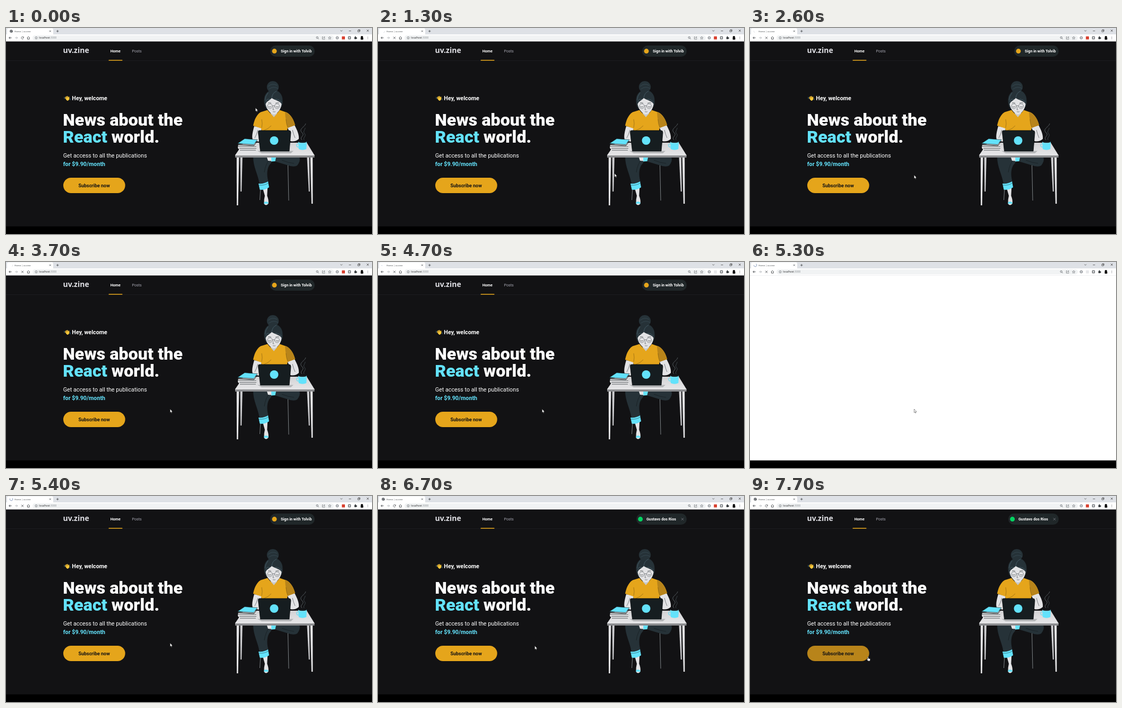
These frames come from a looping animation (690x388 px, 8000 ms). An HTML page with a canvas:

```html
<!DOCTYPE html>
<html lang="en">
<head>
<meta charset="utf-8">
<title>Home | uv.zine</title>
<style>
html, body { margin: 0; width: 100%; height: 100%; overflow: hidden; background: #000; }
canvas { display: block; width: 690px; height: 388px; }
</style>
</head>
<body>
<canvas id="stage"></canvas>
<script>
const W = 690, H = 388, LOOP = 8000, STEP = 100;
const canvas = document.getElementById('stage');
const ctx = canvas.getContext('2d');
const dpr = window.devicePixelRatio || 1;
canvas.width = W * dpr;
canvas.height = H * dpr;

const BG = '#121214', GOLD = '#e5a51b', SHADE = '#b8841a', CYAN = '#63e2fb';
const DARK = '#263238', INK = '#161d20', PALE = '#e3e3e5', ICON = '#5f6368';
const ROBOTO = 'Roboto, Arial, sans-serif', UI = '"Open Sans", "Noto Sans", sans-serif';

// Pointer path: time, x, y
const PATH = [
  [0, 470.4, 150.5], [200, 508, 92], [400, 546, 44], [700, 540, 46],
  [900, 451, 219], [1100, 446, 273], [1300, 446, 274], [1700, 444, 276],
  [2100, 438, 241], [2300, 392, 246], [2600, 309.4, 277], [6600, 309.4, 277],
  [6900, 268, 293], [7100, 228, 307], [7300, 221.5, 303]
];
const SPINS = [[1300, 2100], [2800, 3100], [3600, 6200]];

function fill(color, d) {
  ctx.fillStyle = color;
  ctx.fill(new Path2D(d));
}
function line(color, width, d) {
  ctx.strokeStyle = color;
  ctx.lineWidth = width;
  ctx.stroke(new Path2D(d));
}
function rect(color, x, y, w, h) {
  ctx.fillStyle = color;
  ctx.fillRect(x, y, w, h);
}
function round(color, x, y, w, h, r) {
  ctx.fillStyle = color;
  ctx.beginPath();
  ctx.roundRect(x, y, w, h, r);
  ctx.fill();
}
function ellipse(color, x, y, rx, ry = rx) {
  ctx.fillStyle = color;
  ctx.beginPath();
  ctx.ellipse(x, y, rx, ry, 0, 0, 7);
  ctx.fill();
}
function ring(color, x, y, r, width, from = 0, to = 2 * Math.PI) {
  ctx.strokeStyle = color;
  ctx.lineWidth = width;
  ctx.beginPath();
  ctx.arc(x, y, r, from, to);
  ctx.stroke();
}
function text(str, x, y, size, color, weight = 700, family = ROBOTO) {
  ctx.font = `${weight} ${size}px ${family}`;
  ctx.fillStyle = color;
  ctx.fillText(str, x, y);
  return x + ctx.measureText(str).width;
}
function cross(x, y, r, color, width) {
  line(color, width, `M${x - r} ${y - r}L${x + r} ${y + r}M${x + r} ${y - r}L${x - r} ${y + r}`);
}

function pointer(t) {
  let i = 1;
  while (i < PATH.length - 1 && PATH[i][0] < t) i++;
  const [t0, x0, y0] = PATH[i - 1], [t1, x1, y1] = PATH[i];
  const k = Math.min(1, Math.max(0, (t - t0) / (t1 - t0)));
  return [x0 + (x1 - x0) * k, y0 + (y1 - y0) * k];
}

function drawSpinner(t) {
  const steps = SPINS.reduce((n, [a, b]) => n + Math.max(0, Math.min(t, b) - a) / STEP, 0);
  if (t < 4700) {
    const a = -steps * 0.55;
    ring('#d3d6da', 10, 6, 2.8, 0.7, a, a + 1.5);
  } else {
    const a = 2.7 + (t - 4700) * 0.004;
    const sweep = 0.4 + 4 * Math.min(1, (t - 4700) / 500);
    ring('#6f86ad', 10, 6, 2.8, 0.8, a, a + sweep);
  }
}

function drawBrowser(t, loading) {
  rect('#dee1e6', 0, 0, W, 12);
  round('#fff', 2, 0.5, 87, 14, 3);
  rect('#fff', 0, 12, W, 13);
  rect('#dadce0', 0, 25, W, 0.4);
  if (loading) drawSpinner(t);
  else {
    ellipse('#4d5156', 10, 6, 2.8);
    line('#fff', 0.6, 'M8 5.2L10 6.3L9.5 8M10.2 3.8L11 5L12.2 5.3');
  }
  text('Home | uv.zine', 16, 7.7, 4.3, '#3c4043', 400, UI);
  cross(83.3, 6, 1.4, '#3c4043', 0.7);
  line('#3c4043', 0.8, 'M95 6H99.4M97.2 3.8V8.2');

  line('#333', 0.7, 'M630.5 4.4L632.3 6.2L634.1 4.4M646.5 5.5H650.5');
  line('#333', 0.7, 'M663.3 4.2H666.3V7.2H663.3ZM664.4 4V3.2H667.3V6.2H666.5');
  cross(682, 5, 1.9, '#333', 0.7);

  line('#4a4d51', 0.9, 'M10.5 18.5H5.7M8 16.2L5.7 18.5L8 20.8');
  line('#b4b7bb', 0.9, 'M17 18.5H21.8M19.5 16.2L21.8 18.5L19.5 20.8');
  if (loading) cross(31, 18.5, 2, '#4a4d51', 0.9);
  else {
    ring('#4a4d51', 31, 18.6, 2.2, 0.8, 0.5, 5.6);
    fill('#4a4d51', 'M33.6 16V18.4H31.2Z');
  }
  line('#4a4d51', 0.9, 'M39.7 18.5L42.3 16.2L44.9 18.5M40.5 18V21H44.1V18');

  round('#f1f3f4', 50, 13.7, 568, 9.8, 4.9);
  ring(ICON, 57, 18.5, 2.2, 0.6);
  line(ICON, 0.7, 'M57 18.1V19.8M57 17V17.5');
  const x = text('localhost', 62.3, 20.3, 4.9, '#202124', 400, UI);
  text(':3000', x, 20.3, 4.9, '#80868b', 400, UI);

  ring(ICON, 586.7, 18, 1.7, 0.8);
  line(ICON, 0.9, 'M588 19.3L589.7 21');
  line(ICON, 0.7, 'M597.7 16.5H596.4V21H601V19.5M598 19Q598.5 17.3 601 17.3M599.8 16L601.2 17.3L599.8 18.6');
  line(ICON, 0.6, 'M610.3 15.9L611 17.8L613 17.9L611.5 19.2L612 21.1L610.3 20L608.6 21.1L609.1 19.2L607.6 17.9L609.6 17.8Z');
  ellipse('#8d9196', 624.5, 18.5, 2.8);
  ellipse('#dfe1e3', 624.5, 18.5, 1.5);
  if (t >= 3800 && t < 5400) round('#e7e8ea', 633.3, 15.8, 5.6, 5.6, 0.6);
  else round('#d8402f', 633.2, 15.7, 5.8, 5.8, 0.6);
  round('#6b6f73', 644.8, 15.8, 5.4, 5.4, 1);
  round('#fff', 646.2, 17.2, 2.6, 2.6, 0.6);
  round('#3c4043', 656.8, 17, 4, 4, 0.6);
  ellipse('#3c4043', 658.7, 16.6, 1);
  ellipse('#3c4043', 661, 19, 1);
  ellipse('#111', 671, 17.4, 2.3);
  round('#111', 668.6, 18.2, 5, 3.8, 1.2);
  for (let i = -1; i < 2; i++) ellipse(ICON, 682, 18.5 + i * 1.8, 0.55);
}

function drawWave() {
  ctx.save();
  ctx.translate(115.2, 132.2);
  ctx.rotate(-0.6);
  ctx.lineCap = 'round';
  round('#fdc93b', -2.9, -0.6, 5.8, 5.2, 2.2);
  for (let i = 0; i < 4; i++) {
    const fx = -2.2 + i * 1.45;
    line('#fdc93b', 1.3, `M${fx} 1L${fx * 1.15} ${-3.6 + Math.abs(i - 1.4) * 0.6}`);
  }
  line('#fdc93b', 1.5, 'M2.2 3L4 0.2');
  line('#d99a1d', 0.3, 'M-1.5 0V-2.6M0 0V-2.9M1.4 0V-2.4');
  line('#4fa8d8', 0.5, 'M-4.7 -2Q-4.4 -3.8 -3.2 -4.7M4.6 4Q4 5.5 2.8 6');
  ctx.restore();
}

function drawLegs() {
  line('#8a9093', 0.9, 'M531.5 256L533 325M480 300L478.5 324');
  fill(PALE, 'M434.8 244H439.4L437.6 334H435Z');
  fill('#cdcdd0', 'M441.6 244H445.8L444.2 308H442.2Z');
  fill(PALE, 'M573.6 244H578.2L578.4 331H575.9Z');
  fill('#cdcdd0', 'M567.5 244H571.7L572.8 308H570.8Z');

  fill(DARK, 'M500 243H553Q556 250 549 259Q545 262 536 260L503 250Z');
  fill(DARK, 'M466 243H502Q504 250 496 259C491 268 492 280 495 291L478 294C475 275 466 262 466 243Z');
  line(INK, 0.7, 'M498 246Q489 256 487 272M520 249Q532 254 543 255');
  fill(CYAN, 'M499 244H509L507.5 251L500 251.5Z');
  fill(PALE, 'M492 244H500L500.5 250.5L494 250Z');
  fill(PALE, 'M484 302H493L492.3 316Q496 325 494.4 331Q490 336 486.5 331Q486 323 488 316Z');
  fill(CYAN, 'M476 293Q486 294 494 289L496 300Q488 306 478.5 304.5Z');
  line(INK, 0.5, 'M476.5 296Q487 297 494.6 292');
  fill(CYAN, 'M486.6 328Q490 326 494.6 328.5L494.2 331.5Q490 330 486.7 331.5Z');
}

function drawWoman() {
  fill(PALE, 'M468 185L482 188C481 197 479 203 477 207V214L467 213Q461 208 468 185Z');
  fill(PALE, 'M531 188L544 183C549 192 553 202 552 209Q545 215 536 213V200Z');
  line(INK, 0.5, 'M475 192Q472 202 469 207M540 192Q542 201 545 207');
  fill(GOLD, 'M493 154.5L480 158.5C471 164 467.5 176 466 184L481 189L483 197H529L531 188L545 183C542.5 173 537 163 529 159L516 154.5Q505 172 493 154.5Z');
  fill(SHADE, 'M526 158L529 159C537 163 542.5 173 545 183L531 188Q527 176 526 158Z');
  line('#7f5c12', 0.6, 'M482 188Q484 180 482 172M531 187Q528 180 528 172M486 193Q495 190 500 184');
  ellipse(DARK, 503, 111, 11.2, 11);
  line('#455a64', 0.5, 'M494 110Q502 103 511 108M496 115Q504 109 513 114');
  fill(DARK, 'M486.5 138C486 125 493 117 504 117S522 125 521.5 138C522 145 519 150 516 153H492C488 149 487 144 486.5 138Z');
  fill('#c8c9cb', 'M499 154V161L505 168L511 161V154Z');
  fill(PALE, 'M489.5 144C490 139 496 137 501 132C509 137 516 137 519.5 143C519 152 511.5 162.5 505 163C499 162 491 153 489.5 144Z');
  line('#607d8b', 0.5, 'M501 132Q502 122 510 119M497 135Q491 132 490 139M508 134Q516 135 519 140M494 122Q489 128 488.5 136');
  ring('#4b5559', 497.5, 147.3, 4.6, 0.6);
  ring('#4b5559', 511, 147.3, 4.6, 0.6);
  line(INK, 0.6, 'M502.2 147Q504.2 146 506.3 147M494.5 148Q497.5 150 500 148M508.5 148Q511 150 514 148M494 141.2Q497 140 500 141.7M508 141.7Q512 140 515 141.2');
  line(INK, 0.5, 'M504 149L503.3 154H505.5M503 157.5Q505.5 158.8 508 157.5');
}

function drawDesk() {
  const top = ctx.createLinearGradient(0, 215, 0, 240);
  top.addColorStop(0, '#d2d2d4');
  top.addColorStop(1, '#e6e6e8');
  fill(top, 'M448 216H567L581.5 239.5H432Z');
  drawWoman();
  fill('#b4b6b8', 'M474 231.5H542L537 236H482Z');
  rect('#e6e6e8', 432, 239, 149.6, 1.6);
  rect('#8b8c8f', 432, 240.6, 149.6, 3.4);

  const lid = 'M478 193H533.5Q537 193 537 197L534 232H479.5L475.5 197Q475 193 478 193Z';
  fill(INK, lid);
  line('#050809', 0.7, lid);
  ellipse(CYAN, 505.5, 212, 8);

  fill(PALE, 'M438 219L470 218L473 222L471 230L441 230L437 226Z');
  line(INK, 0.7, 'M438 223H472M440 226.6H472M441 230H471M438 219.5L468 221L474 213');
  fill(CYAN, 'M436.5 217.5L450 208.5L474 210.5L467 219.5Z');
  line(INK, 0.6, 'M436.5 217.5L450 208.5L474 210.5L467 219.5ZM436.5 217.5V220L467 222L474 213');

  ring(CYAN, 551, 221, 3.2, 1.2, 1.3, 5);
  fill(CYAN, 'M551 214H567L566.3 228Q559 231.5 551.8 228Z');
  ellipse(INK, 559, 214.5, 7.6, 1.8);
  line('#b8f2fc', 0.4, 'M551.3 216Q559 219 566.7 216');
  line('#737d82', 0.7, 'M558 211C552 205 565 203 558 197C551 190 563 187 565 180');
  line('#4d585d', 0.7, 'M562 211C559 206 567 204 563 199C559 195 564 192 564 188');
}

function drawPage(t, hover) {
  rect(BG, 0, 25, W, 348.7);
  rect('#242429', 0, 61, W, 0.6);
  text('uv.zine', 107.5, 47, 14, '#e1e1e6', 700, '"Noto Sans", "Open Sans", sans-serif');
  text('Home', 196.7, 46, 7.17, '#fff');
  text('Posts', 237.5, 46, 7.17, '#a8a8b3', 400);
  round(GOLD, 193.5, 60, 26, 1.4, [0.7, 0.7, 0, 0]);

  if (t >= 6100) {
    round('#202729', 487, 33, 95, 21, 10.5);
    ellipse('#04d361', 494.7, 43.6, 4.5);
    text('Gustavo dos Rios', 506, 46, 7.17, '#fff');
    cross(574, 43.6, 2.2, '#8b8b96', 0.7);
  } else {
    round('#202729', 498, 33, 84, 21, 10.5);
    ellipse(GOLD, 506, 43.6, 4.5);
    text('Sign in with Tolvib', 518, 46, 7.17, '#fff');
  }

  drawWave();
  text('Hey, welcome', 124.3, 136, 10.75, '#fff');
  text('News about the', 107.2, 184, 32.26, '#fff', 900);
  const x = text('React', 107.2, 216.3, 32.26, CYAN, 900);
  text(' world.', x, 216.3, 32.26, '#fff', 900);
  text('Get access to all the publications', 107.7, 244, 10.75, '#fff', 400);
  text('for $9.90/month', 107.7, 260, 10.75, CYAN);
  round(hover ? SHADE : GOLD, 108, 282, 116.7, 29, 14.5);
  text('Subscribe now', 136.5, 300, 8.96, BG);

  drawLegs();
  drawDesk();
}

function drawPointer(x, y, hand) {
  ctx.save();
  ctx.translate(x, y);
  ctx.lineJoin = 'round';
  const d = hand
    ? 'M0.2 0.6Q1 -0.3 1.7 0.6V3L4.6 3.6Q5.3 4 5.1 5L4.5 7.8H1.2L-1.3 4.8Q-1 3.8 0.2 4.6Z'
    : 'M0 0V6.6L1.5 5.3L2.5 7.5L3.6 7L2.6 4.9H4.6Z';
  fill('#fff', d);
  line('#222', 0.5, d);
  ctx.restore();
}

function draw(t) {
  ctx.setTransform(dpr, 0, 0, dpr, 0, 0);
  ctx.lineCap = 'butt';
  rect('#000', 0, 0, W, H);
  const [x, y] = pointer(t);
  const onSubscribe = x < 225 && y > 282;
  const onSign = x > 498 && x < 582 && y > 33 && y < 54;
  if (t >= 4800 && t < 5400) rect('#fff', 0, 25, W, 348.7);
  else drawPage(t, onSubscribe);
  drawBrowser(t, t >= 1300 && t < 6300);
  drawPointer(x, y, onSubscribe || onSign);
}

const start = performance.now();
function tick() {
  const t = (performance.now() - start) % LOOP;
  draw(Math.floor(t / STEP) * STEP);
  requestAnimationFrame(tick);
}
tick();
</script>
</body>
</html>
```
